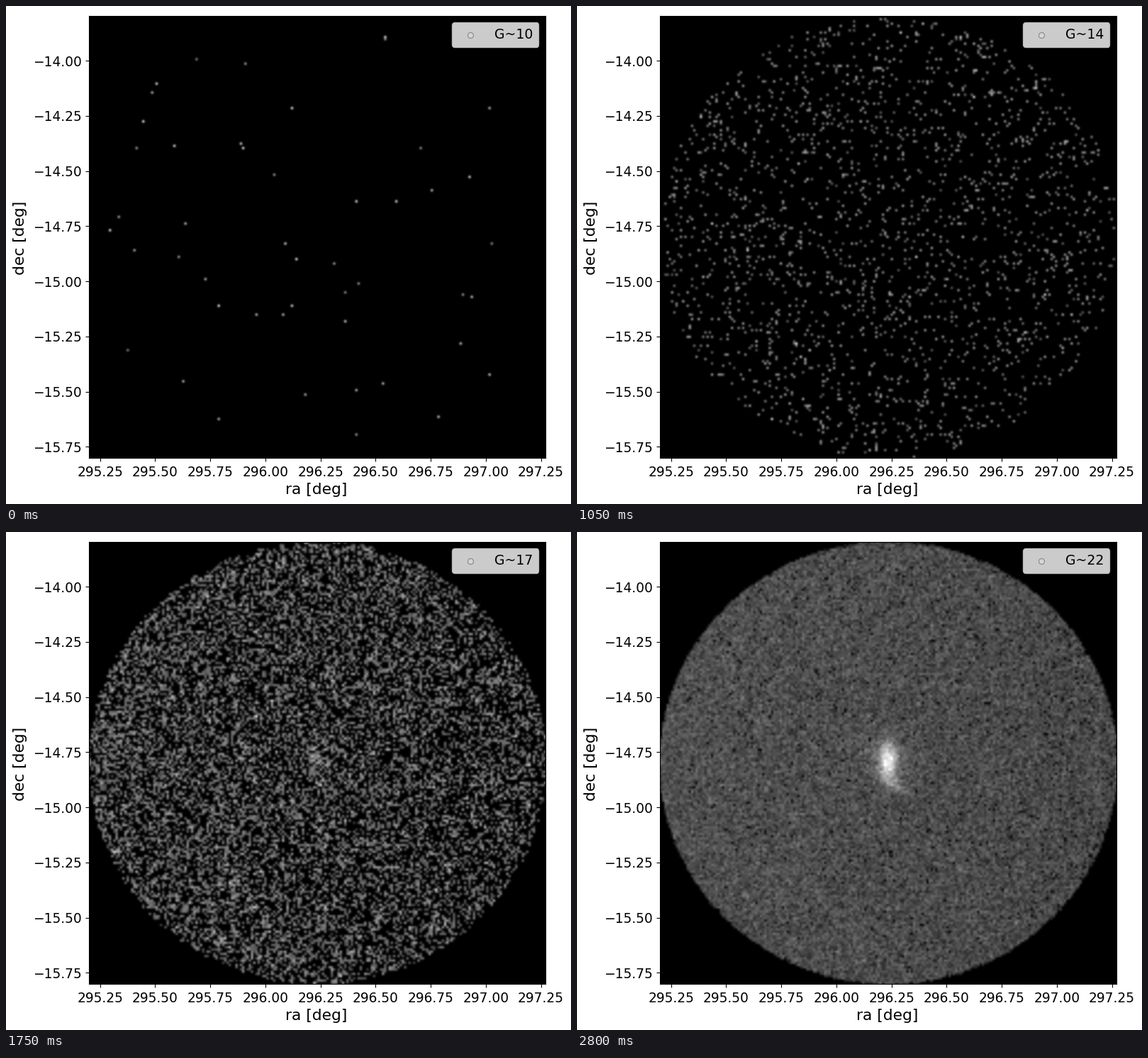
These frames come from a looping animation (797 px wide and 702 px high, 3.5 s). A matplotlib script:

```python
import numpy as np
import matplotlib.pyplot as plt
from matplotlib.animation import FuncAnimation

W, H, DPI = 797, 702, 64
PT = 72 / DPI                      # points per pixel
plt.rcParams["font.family"] = "DejaVu Sans"
rng = np.random.default_rng(6822)

COLS, ROWS = 206, 199
LEFT, RIGHT, TOP, BOTTOM = 116.6, 760.8, 14, 636.6
EXTENT = (295.1986, 297.27, -15.7986, -13.7967)
LIMITS = 10 + 1.5 * np.arange(9)   # magnitude limit of each view

# A few landmark stars as (column, row) cells
LANDMARKS = np.array([(133, 10), (30, 30), (91, 41), (180, 41), (171, 72),
                      (138, 83), (181, 102), (17, 150), (97, 170), (58, 181)]) + 0.5


def field_count(mag):
    """Star counts rise steeply, then flatten near the survey limit."""
    return int(10 ** np.interp(mag, [10, 13, 19, 22], [1.69, 2.85, 4.72, 5.13]))


def galaxy_count(mag):
    return int(3800 * 10 ** (0.38 * (mag - 22)))


def make_field(n):
    """Stars spread over the disc, slightly denser to the left."""
    r, a = np.sqrt(rng.random(n)), rng.uniform(0, 2 * np.pi, n)
    x, y = r * np.cos(a), r * np.sin(a)
    keep = rng.random(n) < 0.88 - 0.1 * x - 0.02 * y
    xy = np.column_stack([(1 + x) * COLS / 2, (1 + y) * ROWS / 2])[keep]
    return np.vstack([LANDMARKS, xy])


def blob(n, cx, cy, sx, sy, slope=0.0):
    """Gaussian clump, sheared by slope."""
    x = rng.normal(0, sx, n)
    return np.column_stack([cx + x, cy + slope * x + rng.normal(0, sy, n)])


def make_galaxy():
    bar = blob(2200, 102.8, 98.5, 2.1, 5)
    arm = blob(330, 104.6, 108.5, 3.5, 1.5, 0.6)
    halo = blob(1000, 103.5, 99, 6.5, 6)
    streak = blob(270, 104, 102, 6.5, 3.5, 1.0)
    return rng.permutation(np.vstack([bar, arm, halo, streak]))


def density(mag):
    """Square-root stretched grey map of all stars down to mag."""
    n, m = field_count(mag), galaxy_count(mag)
    x, y = np.vstack([field[:n], galaxy[:m]]).T
    weights = np.concatenate([field_w[:n], galaxy_w[:m]])
    counts = np.histogram2d(y, x, bins=(ROWS, COLS),
                            range=((0, ROWS), (0, COLS)), weights=weights)[0]
    gain = 255 - 17.3 * (mag - 10)
    return gain * np.sqrt(counts)


field, galaxy = make_field(180000), make_galaxy()
field_w = rng.uniform(0.3, 1, len(field))
galaxy_w = rng.uniform(0.3, 1, len(galaxy))
maps = [density(mag) for mag in LIMITS]

fig = plt.figure(figsize=(W / DPI, H / DPI), dpi=DPI, facecolor="white")
ax = fig.add_axes([LEFT / W, 1 - BOTTOM / H, (RIGHT - LEFT) / W, (BOTTOM - TOP) / H])
sky = ax.imshow(maps[0], cmap="gray", vmin=0, vmax=255, extent=EXTENT,
                aspect="auto", interpolation="gaussian")
ax.scatter([], [], s=(8 * PT) ** 2, facecolor="0.84", edgecolor="0.55",
           linewidth=1.2 * PT, label="G~10")
ax.set(xlim=EXTENT[:2], ylim=EXTENT[2:],
       xticks=np.arange(295.25, 297.26, 0.25), yticks=np.arange(-15.75, -13.9, 0.25))
ax.xaxis.set_major_formatter("{x:.2f}")
ax.yaxis.set_major_formatter("{x:.2f}")
ax.tick_params(labelsize=18.6 * PT, length=5 * PT, width=1.1 * PT)
ax.tick_params(axis="x", pad=6 * PT)
ax.tick_params(axis="y", pad=4.5 * PT)
for side in ax.spines.values():
    side.set_linewidth(1.1 * PT)

label = dict(fontsize=21.7 * PT, ha="center", va="baseline")
fig.text(438 / W, 1 - 687.5 / H, "ra [deg]", **label)
fig.text(26 / W, 1 - 326.5 / H, "dec [deg]", rotation=90,
         rotation_mode="anchor", **label)

legend = ax.legend(loc="upper right", fontsize=18.9 * PT, framealpha=0.8)
legend.get_frame().set_linewidth(1.4 * PT)
caption = legend.get_texts()[0]


def update(i):
    k = min(i, len(maps) - 1)      # the deepest view is held twice as long
    sky.set_data(maps[k])
    caption.set_text(f"G~{int(LIMITS[k])}")
    return sky, caption


anim = FuncAnimation(fig, update, frames=10, interval=350, repeat=True,
                     repeat_delay=0, blit=False)
plt.show()
```
